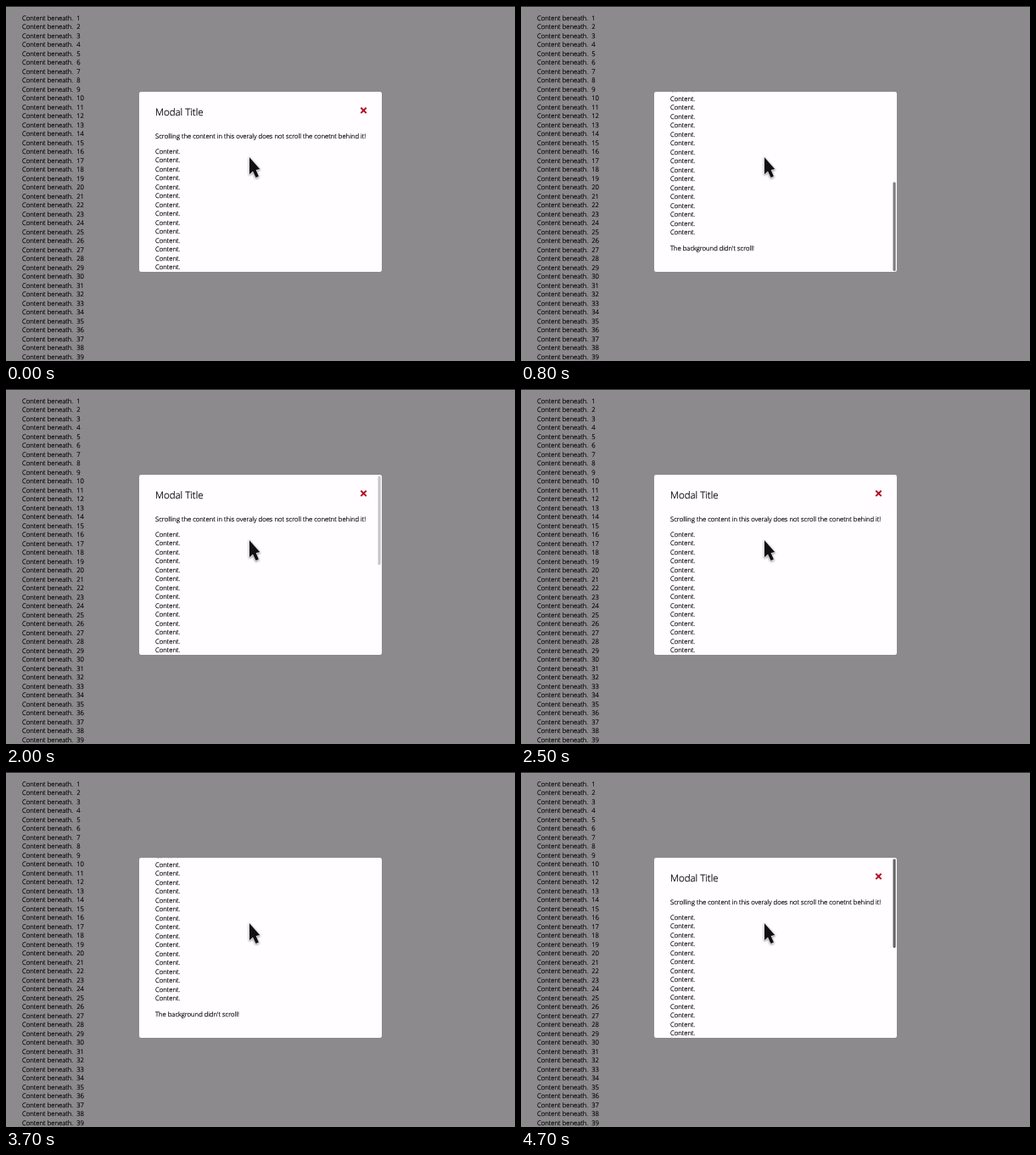
An HTML page that plays this animation: 600x418 px, repeating every 4800 ms.

```html
<!DOCTYPE html>
<html lang="en">
<head>
<meta charset="utf-8">
<title>Modal scrolling</title>
<style>
  html, body { margin: 0; width: 100%; height: 100%; overflow: hidden; background: #8c8a8c; }
  svg { display: block; width: 600px; height: 418px; }
  text { font: 300 7.68px "Open Sans", sans-serif; fill: #000; stroke: #000; stroke-width: .22; text-rendering: geometricPrecision; white-space: pre; }
  .title { font-size: 11.5px; }
  .panel { fill: #fffdff; filter: drop-shadow(0 .8px .7px rgba(0, 0, 0, .4)); }
  .close { stroke: #b80a22; stroke-width: 2; }
  .pointer { fill: #111; stroke: #e4e2e4; stroke-width: 1.6; stroke-linejoin: round; paint-order: stroke; filter: drop-shadow(0 1px 1.2px rgba(0, 0, 0, .4)); }
</style>
</head>
<body>
<svg viewBox="0 0 600 418">
  <defs><clipPath id="window"><rect x="157" y="101" width="286" height="212" rx="2"/></clipPath></defs>
  <rect width="600" height="418" fill="#8c8a8c"/>
  <rect width="600" height="1" fill="#2b2a2b"/>
  <g id="beneath"></g>
  <rect class="panel" x="157" y="101" width="286" height="212" rx="2"/>
  <g clip-path="url(#window)">
    <g id="content">
      <path class="close" d="M418.3 119.7l6.4 6.4m0-6.4l-6.4 6.4"/>
    </g>
    <rect id="thumb" x="438.5" width="3.2" height="105" rx="1.6"/>
  </g>
  <path class="pointer" d="M287 178.2V198L291 194.4L294.5 202L297.9 200.6L294.6 193.1L299.2 192Z"/>
</svg>
<script>
const LOOP = 4800, LINE = 10.5, BOTTOM = 209, NUDGE = 4.5;
const beneath = document.getElementById('beneath');
const content = document.getElementById('content');
const thumb = document.getElementById('thumb');

function addText(parent, x, y, string, className = '') {
  const node = document.createElementNS('http://www.w3.org/2000/svg', 'text');
  node.setAttribute('x', x);
  node.setAttribute('y', y);
  node.setAttribute('class', className);
  node.textContent = string;
  parent.append(node);
}

for (let i = 0; i < 39; i++) addText(beneath, 19, 16.8 + i * LINE, `Content beneath.  ${i + 1}`);
addText(content, 176, 129.1, 'Modal Title', 'title');
addText(content, 176, 155.9, 'Scrolling the content in this overaly does not scroll the conetnt behind it!');
for (let i = 0; i < 30; i++) addText(content, 176, 173.8 + i * LINE, 'Content.');
addText(content, 176, 496.9, "The background didn't scroll!");

// Each step: start time, scroll position, scrollbar opacity.
const steps = [
  [0, 0, 0], [100, NUDGE, 0], [200, BOTTOM, .6], [800, BOTTOM, .5], [900, BOTTOM, 0],
  [1200, BOTTOM - NUDGE, 0], [1300, 0, .6], [2000, 0, .22], [2100, 0, 0],
  [2800, NUDGE, 0], [2900, BOTTOM, .6], [3600, BOTTOM, .35], [3700, BOTTOM, 0],
  [4600, BOTTOM - NUDGE, 0], [4700, 0, .6]
];

function draw(now) {
  const time = now % LOOP;
  const [, scroll, opacity] = steps.findLast(([start]) => start <= time);
  content.setAttribute('transform', `translate(0 ${-scroll})`);
  thumb.setAttribute('y', 102.2 + scroll / BOTTOM * 105);
  thumb.setAttribute('opacity', opacity);
}

function tick() {
  draw(performance.now());
  requestAnimationFrame(tick);
}
tick();
</script>
</body>
</html>
```
